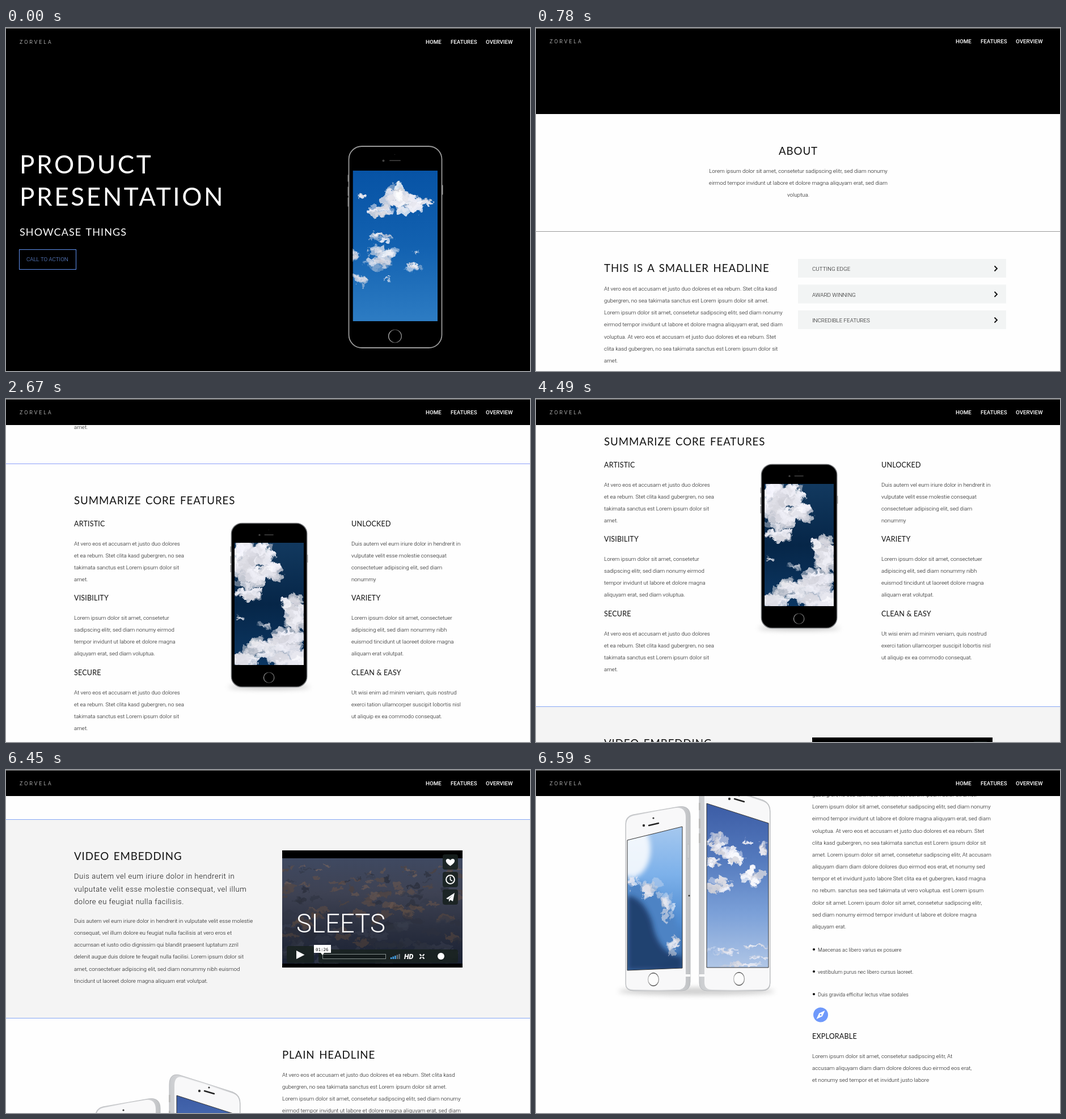
An HTML page for the animation above (8000 ms loop, 924 px wide and 606 px high).

```html
<!DOCTYPE html>
<html lang="en">
<head>
<meta charset="utf-8">
<title>Product presentation</title>
<style>
html, body { margin: 0; width: 100%; height: 100%; overflow: hidden; background: #fff; }
svg { display: block; }
text { font: 300 9.75px Roboto, sans-serif; fill: #111; }
.h1 { font: 400 44px Lato, sans-serif; letter-spacing: 3.6px; fill: #fff; }
.h2 { font: 400 18.7px Lato, sans-serif; letter-spacing: .9px; word-spacing: 2px; }
.h3 { font: 400 12.5px Lato, sans-serif; letter-spacing: .2px; }
.sub { font: 400 18px Lato, sans-serif; letter-spacing: 1.1px; word-spacing: 2px; fill: #fff; }
.lead { font-size: 13px; letter-spacing: .57px; }
.item { font-size: 9px; }
.mid { text-anchor: middle; }
.nav { font-weight: 500; fill: #fff; }
.brand { font-size: 9px; letter-spacing: 2.9px; fill: #fff; }
.cta { fill: #6f9cf5; }
.title { font-size: 45.5px; fill: #fff; }
.time { font: 7.5px "DejaVu Sans Mono", monospace; }
.hd { font: italic 900 12.5px Roboto, sans-serif; fill: #fff; }
</style>
</head>
<body>
<svg id="stage" width="924" height="606" viewBox="0 0 924 606"></svg>
<script>
const STEP = 538, LOOP = 8000;

// [time, scroll position]
const scrolls = [
  [0, 0], [500, 60], [570, 410], [640, STEP],
  [2530, STEP + 60], [2600, STEP + 410], [2670, 2 * STEP],
  [4490, 2 * STEP + 104], [4560, 2 * STEP + 468], [4630, 3 * STEP],
  [6450, 3 * STEP + 22], [6520, 3 * STEP + 350], [6590, 4 * STEP]
];

let seed = 11;
const rand = (a = 0, b = 1) => a + (b - a) * ((seed = seed * 16807 % 2147483647) / 2147483647);

const text = (x, y, s, cls = '') => `<text x="${x}" y="${y}" class="${cls}">${s}</text>`;
const lines = (x, y, s, cls, pitch = 21.15) =>
  s.split('|').map((l, i) => text(x, Math.round(y + pitch * i), l, cls)).join('');
const rect = (x, y, w, h, fill, more = '') =>
  `<rect x="${x}" y="${y}" width="${w}" height="${h}" fill="${fill}" ${more}/>`;
const path = (d, fill, more = '') => `<path d="${d}" fill="${fill}" ${more}/>`;
const circle = (x, y, r, fill, more = '') => `<circle cx="${x}" cy="${y}" r="${r}" fill="${fill}" ${more}/>`;
const ellipse = (x, y, rx, ry, fill, more = '') =>
  `<ellipse cx="${x}" cy="${y}" rx="${rx}" ry="${ry}" fill="${fill}" ${more}/>`;
const rule = (y, colour) => rect(0, y, 924, 1, colour);
const screen = (n, ...parts) => `<g transform="translate(0 ${STEP * n})">${parts.join('')}</g>`;
const gradient = (id, stops, dir = 'x2="0" y2="1"') => `<linearGradient id="${id}" ${dir}>` +
  stops.map((c, i) => `<stop offset="${i / (stops.length - 1)}" stop-color="${c}"/>`).join('') + '</linearGradient>';

// Each puff of vapour is [x, y, half width, half height]
function vapour(list, n, opacity = .6) {
  let out = '';
  for (const [x, y, rx, ry] of list)
    for (let i = 0; i < n; i++) {
      const a = rand(0, 6.283), r = Math.sqrt(rand()) * .75, k = rand(.2, .45);
      const tone = Math.round(rand(205, 255));
      out += ellipse((x + rx * r * Math.cos(a)).toFixed(1), (y + ry * r * Math.sin(a)).toFixed(1),
        (rx * k).toFixed(1), (ry * k).toFixed(1), `rgb(${tone},${tone},${Math.min(255, tone + 8)})`,
        `opacity="${rand(opacity - .2, opacity + .3).toFixed(2)}"`);
    }
  return `<g filter="url(#fluff)">${out}</g>`;
}

const picture = (id, d, fill, inner) =>
  `<clipPath id="${id}"><path d="${d}"/></clipPath><g clip-path="url(#${id})">${path(d, fill)}${inner}</g>`;

const phone = (x, y, k, rim) => `<g transform="translate(${x} ${y}) scale(${k})">` +
  rect(-1.5, 51, 3, 12, '#777') + rect(-1.5, 72, 3, 16, '#777') + rect(-1.5, 91, 3, 16, '#777') +
  rect(163.5, 69, 3, 17, '#999') +
  rect(.5, .5, 164, 356, '#000', `rx="23" stroke="${rim}" stroke-width="1.8"`) +
  circle(61.5, 26, 2, '#444') + circle(81.5, 15, .8, '#222') + rect(72, 25, 20, 1.6, '#444', 'rx=".8"') +
  circle(82, 336, 11.3, 'none', 'stroke="url(#ring)" stroke-width="1.3"') + '</g>';

const accordion = (y, s) => rect(462, y, 367, 33, '#f2f4f4') + text(487, y + 21, s) +
  path(`M808.5 ${y + 12.5}l4.5 4.5l-4.5 4.5`, 'none', 'stroke="#111" stroke-width="1.9"');

const feature = (x, y, head, body) => text(x, y, head, 'h3') + lines(x, y + 34, body);

function videoSky() {
  let puffs = '';
  for (let i = 0; i < 170; i++) {
    const d = i / 170, y = 192 + 170 * d ** 1.3;
    const size = 3 + 9 * d, light = rand(18, 46 - 20 * d);
    puffs += ellipse(rand(487, 805).toFixed(1), y.toFixed(1), (size * rand(1, 2)).toFixed(1),
      (size * rand(.4, .8)).toFixed(1), `hsl(${light > 27 ? 20 : 225} 16% ${light.toFixed(0)}%)`, 'opacity=".6"');
  }
  return rect(487, 178, 318, 186, 'url(#dusk)') + `<g filter="url(#fluff)">${puffs}</g>`;
}

function player() {
  const box = (x, y, w, h) => rect(x, y, w, h, '#18211f', 'rx="4" opacity=".88"');
  let bars = '';
  for (let i = 0; i < 5; i++) {
    const h = 3 + 1.5 * i;
    bars += rect(678 + 3.6 * i, 356 - h, 2.4, h, i < 3 ? '#45a5ee' : '#69727a');
  }
  return rect(487, 164, 318, 207, '#000') +
    `<clipPath id="film"><rect x="487" y="178" width="318" height="186"/></clipPath>` +
    `<g clip-path="url(#film)">${videoSky()}</g>` +
    text(512, 309, 'SLEETS', 'title') +
    box(770, 171, 27, 27) + box(770, 202, 27, 27) + box(770, 233, 27, 27) +
    path('M783.5 191.5c-10-6-9-12.5-4-12.5q3 0 4 2.5q1-2.5 4-2.5c5 0 6 6.5-4 12.5z', '#fff') +
    circle(783.5, 215.5, 7.4, 'none', 'stroke="#fff" stroke-width="2"') +
    path('M783.5 210.5v5.5l3.5 2', 'none', 'stroke="#fff" stroke-width="1.6"') +
    path('M776 249L791 239L788 254L783.5 251.5L781 255V250L788 242.5L779.5 250.5Z', '#fff') +
    box(495, 333, 48, 30) + path('M512 341L526.5 348.5L512 356Z', '#fff') +
    box(551, 339, 246, 24) +
    rect(558.5, 347.5, 111, 8, '#141b1c', 'stroke="#87908f"') +
    path('M543 331H573V345H561L558 349L555 345H543Z', '#fff') +
    text(546, 341.5, '01:26', 'time') + bars + text(702, 356, 'HD', 'hd') +
    path('M729.5 347.5l3 3m5-3l-3 3m-5 5l3-3m5 3l-3-3', 'none', 'stroke="#fff" stroke-width="2.2"') +
    circle(767, 351, 6, '#fff');
}

function whitePhones() {
  const edge = 'stroke="#b9bbbe" stroke-width="1"';
  const dots = (x, y, dx, dy) => circle(x, y, 2.2, '#333') +
    path(`M${x + dx} ${y}l17 ${dy}`, 'none', 'stroke="#222" stroke-width="2.4" stroke-linecap="round"');
  const home = (x, y) => ellipse(x, y, 9.5, 11.3, '#fcfcfc', 'stroke="url(#ring)" stroke-width="1.3"');
  const frame = 'stroke="#333" stroke-width="1"';
  const left = 'M161 124L258 100V350L161 354Z', right = 'M301 59L410 94V349H301Z';
  return ellipse(283, 391, 138, 7, '#999', 'opacity=".45" filter="url(#soft)"') +
    path('M158 95Q158 82 171 79L251 65Q272 62 272 82V374Q272 390 257 390H172Q158 390 158 378Z', 'url(#metal)', edge) +
    path('M159 97Q159 84 171 81L246 67Q264 65 264 84V374Q264 388 250 388H172Q159 388 159 378Z', '#f8f8f9') +
    rect(267, 131, 3, 25, '#d0d2d4', edge) + circle(270, 222, 1.5, '#333') + rect(264, 361, 8, 4, '#fff') +
    dots(190, 98, 9, -4) + circle(207, 85, 1.6, '#333') + home(207, 370) +
    picture('skyLeft', left, 'url(#day)',
      ellipse(168, 140, 34, 50, '#fff', 'opacity=".85" filter="url(#soft)"') +
      path('M161 200Q205 190 240 250Q255 280 250 330L200 354H161Z', '#4d83c4', 'filter="url(#soft)"') +
      path('M161 222Q190 225 205 270Q215 325 258 330V354H161Z', '#1e3a68', 'filter="url(#soft)" opacity=".9"') +
      vapour([[172, 197, 14, 14], [206, 212, 22, 20], [232, 240, 15, 27], [242, 310, 13, 20]], 14, .35)) +
    path(left, 'none', frame) +
    path('M288 40Q288 19 306 23L400 53Q413 58 413 73V376Q413 390 399 390H302Q288 390 288 376Z', 'url(#metal)', edge) +
    path('M297 42Q297 23 312 27L399 55Q412 59 412 74V375Q412 388 399 388H310Q297 388 297 375Z', '#f8f8f9') +
    rect(287, 58, 3, 13, '#bbb') + rect(287, 86, 3, 17, '#bbb') + rect(287, 112, 3, 17, '#bbb') +
    rect(288, 361, 9, 4, '#fff') +
    dots(341, 51, 9, 5) + circle(358, 45, 1.6, '#333') + home(358, 369) +
    picture('skyRight', right, 'url(#noon)',
      vapour([[318, 127, 18, 20], [344, 154, 24, 18], [312, 162, 12, 10], [383, 188, 20, 20],
        [326, 203, 26, 13], [372, 128, 9, 5], [399, 137, 9, 12]], 16) +
      vapour([[325, 320, 30, 8], [385, 312, 26, 5], [360, 342, 50, 5], [390, 331, 24, 4]], 10, .4)) +
    path(right, 'none', frame);
}

const lorem = 'At vero eos et accusam et justo duo dolores|et ea rebum. Stet clita kasd gubergren, no sea|takimata sanctus est Lorem ipsum dolor sit|amet.';

const hero = screen(0,
  rect(0, 0, 924, 690, '#000'),
  lines(24, 257, 'PRODUCT|PRESENTATION', 'h1', 57),
  text(24, 367, 'SHOWCASE THINGS', 'sub'),
  rect(23.5, 391.5, 100, 35, 'none', 'stroke="#5f90ee"'),
  text(36, 412, 'CALL TO ACTION', 'cta'),
  phone(604, 208.5, 1, '#9a9a9a'),
  picture('skyHero', 'M611.5 252H761V518H611.5Z', 'url(#azure)',
    vapour([[688, 298, 24, 20], [660, 322, 24, 13], [710, 312, 30, 18], [739, 308, 16, 6], [627, 297, 8, 6]], 22) +
    vapour([[661, 369, 26, 9], [667, 395, 24, 17], [662, 416, 30, 15], [718, 424, 18, 8],
      [613, 401, 8, 12], [628, 442, 22, 11], [672, 442, 9, 5], [722, 396, 7, 3]], 14, .45)));

const about = screen(1,
  text(462.5, 223.5, 'ABOUT', 'h2 mid'),
  lines(462.5, 256, 'Lorem ipsum dolor sit amet, consetetur sadipscing elitr, sed diam nonumy|eirmod tempor invidunt ut labore et dolore magna aliquyam erat, sed diam|voluptua.', 'mid'),
  rule(359, '#999'),
  text(120, 431, 'THIS IS A SMALLER HEADLINE', 'h2'),
  lines(120, 464, 'At vero eos et accusam et justo duo dolores et ea rebum. Stet clita kasd|gubergren, no sea takimata sanctus est Lorem ipsum dolor sit amet.|Lorem ipsum dolor sit amet, consetetur sadipscing elitr, sed diam nonumy|eirmod tempor invidunt ut labore et dolore magna aliquyam erat, sed diam|voluptua. At vero eos et accusam et justo duo dolores et ea rebum. Stet|clita kasd gubergren, no sea takimata sanctus est Lorem ipsum dolor sit|amet.'),
  accordion(408, 'CUTTING EDGE'), accordion(453.5, 'AWARD WINNING'), accordion(499, 'INCREDIBLE FEATURES'));

const features = screen(2,
  rule(114, '#8c9ffa'),
  text(120, 186, 'SUMMARIZE CORE FEATURES', 'h2'),
  feature(120, 225, 'ARTISTIC', lorem),
  feature(120, 356, 'VISIBILITY', 'Lorem ipsum dolor sit amet, consetetur|sadipscing elitr, sed diam nonumy eirmod|tempor invidunt ut labore et dolore magna|aliquyam erat, sed diam voluptua.'),
  feature(120, 488, 'SECURE', lorem),
  feature(609, 225, 'UNLOCKED', 'Duis autem vel eum iriure dolor in hendrerit in|vulputate velit esse molestie consequat|consectetuer adipiscing elit, sed diam|nonummy'),
  feature(609, 356, 'VARIETY', 'Lorem ipsum dolor sit amet, consectetuer|adipiscing elit, sed diam nonummy nibh|euismod tincidunt ut laoreet dolore magna|aliquam erat volutpat.'),
  feature(609, 488, 'CLEAN &amp; EASY', 'Ut wisi enim ad minim veniam, quis nostrud|exerci tation ullamcorper suscipit lobortis nisl|ut aliquip ex ea commodo consequat.'),
  ellipse(464, 509, 72, 4, '#888', 'opacity=".5" filter="url(#soft)"'),
  phone(397, 219, .813, '#77797c'),
  picture('skyDeep', 'M403 254H525V470H403Z', 'url(#navy)',
    vapour([[420, 275, 30, 34], [450, 272, 26, 24], [432, 315, 28, 24], [466, 305, 28, 18], [428, 345, 24, 12]], 26) +
    vapour([[508, 362, 26, 20], [512, 392, 22, 28], [500, 425, 32, 22], [460, 440, 40, 20], [425, 462, 34, 14], [500, 458, 40, 22]], 24) +
    vapour([[413, 384, 10, 7], [455, 400, 16, 7]], 8, .3)));

const video = screen(3,
  rect(0, 109, 924, 352, '#f4f4f4'), rule(109, '#86a8f5'), rule(460, '#86a8f5'),
  text(120, 180.5, 'VIDEO EMBEDDING', 'h2'),
  lines(120, 214, 'Duis autem vel eum iriure dolor in hendrerit in|vulputate velit esse molestie consequat, vel illum|dolore eu feugiat nulla facilisis.', 'lead', 22.7),
  lines(120, 292, 'Duis autem vel eum iriure dolor in hendrerit in vulputate velit esse molestie|consequat, vel illum dolore eu feugiat nulla facilisis at vero eros et|accumsan et iusto odio dignissim qui blandit praesent luptatum zzril|delenit augue duis dolore te feugait nulla facilisi. Lorem ipsum dolor sit|amet, consectetuer adipiscing elit, sed diam nonummy nibh euismod|tincidunt ut laoreet dolore magna aliquam erat volutpat.'),
  player(),
  text(487, 531.5, 'PLAIN HEADLINE', 'h2'));

const bullet = (y, s) => circle(490, y - 4, 2.1, '#111') + text(497, y, s, 'item');

const explore = screen(4,
  whitePhones(),
  lines(487, 26, 'At vero eos et accusam et justo duo dolores et ea rebum. Stet clita kasd|gubergren, no sea takimata sanctus est Lorem ipsum dolor sit amet.|Lorem ipsum dolor sit amet, consetetur sadipscing elitr, sed diam nonumy|eirmod tempor invidunt ut labore et dolore magna aliquyam erat, sed diam|voluptua. At vero eos et accusam et justo duo dolores et ea rebum. Stet|clita kasd gubergren, no sea takimata sanctus est Lorem ipsum dolor sit|amet. Lorem ipsum dolor sit amet, consetetur sadipscing elitr, At accusam|aliquyam diam diam dolore dolores duo eirmod eos erat, et nonumy sed|tempor et et invidunt justo labore Stet clita ea et gubergren, kasd magna|no rebum. sanctus sea sed takimata ut vero voluptua. est Lorem ipsum|dolor sit amet. Lorem ipsum dolor sit amet, consetetur sadipscing elitr,|sed diam nonumy eirmod tempor invidunt ut labore et dolore magna|aliquyam erat.'),
  bullet(321, 'Maecenas ac libero varius ex posuere'),
  bullet(360, 'vestibulum purus nec libero cursus laoreet.'),
  bullet(400, 'Duis gravida efficitur lectus vitae sodales'),
  circle(502, 432.5, 13, '#6f99fb'),
  path('M509.5 425L504.8 435.3L494.5 440L499.2 429.7Z', '#fff'), circle(502, 432.5, 1.5, '#6f99fb'),
  text(487, 475, 'EXPLORABLE', 'h3'),
  lines(487, 509, 'Lorem ipsum dolor sit amet, consetetur sadipscing elitr, At|accusam aliquyam diam diam dolore dolores duo eirmod eos erat,|et nonumy sed tempor et et invidunt justo labore'));

const defs = `<defs>
  <filter id="fluff" x="-10%" y="-10%" width="120%" height="120%" color-interpolation-filters="sRGB">
    <feTurbulence type="fractalNoise" baseFrequency=".09" numOctaves="4" result="noise"/>
    <feDisplacementMap in="SourceGraphic" in2="noise" scale="17" xChannelSelector="R" yChannelSelector="G"/>
    <feGaussianBlur stdDeviation=".5"/>
  </filter>
  <filter id="soft" x="-50%" y="-150%" width="200%" height="400%"><feGaussianBlur stdDeviation="4"/></filter>` +
  gradient('azure', ['#0753a5', '#1261b0', '#2d7cc3']) +
  gradient('navy', ['#12395f', '#062648', '#0c3763']) +
  gradient('dusk', ['#3f4961', '#3e4253', '#2b3040', '#1a2133']) +
  gradient('day', ['#a5c8ef', '#7db1ea', '#4f8bd0', '#34639f']) +
  gradient('noon', ['#3c5ca5', '#5379bd', '#7ba0d8', '#b0c6e6']) +
  gradient('metal', ['#c9cbce', '#f0f0f1', '#bfc1c4'], 'x2="1" y2="0"') +
  gradient('ring', ['#bbb', '#333', '#999'], 'x2="1" y2="0"') + '</defs>';

const stage = document.getElementById('stage');
stage.innerHTML = defs + rect(0, 0, 924, 606, '#fefefe') +
  `<g id="page">${hero + about + features + video + explore}</g>` +
  rect(0, 0, 924, 46, '#000') +
  `<g id="menu">${text(24, 27, 'ZORVELA', 'brand') + text(740, 27, 'HOME', 'nav') +
    text(784, 27, 'FEATURES', 'nav') + text(846, 27, 'OVERVIEW', 'nav')}</g>` +
  rule(0, '#8a8a8a');

const page = document.getElementById('page'), menu = document.getElementById('menu');
let shown = -1;

function draw() {
  const t = performance.now() % LOOP;
  const y = scrolls.findLast(([start]) => start <= t)[1];
  if (y !== shown) {
    page.setAttribute('transform', `translate(0 ${-y})`);
    menu.setAttribute('transform', `translate(0 ${y ? 0 : 1})`);
    shown = y;
  }
  requestAnimationFrame(draw);
}
draw();
</script>
</body>
</html>
```
